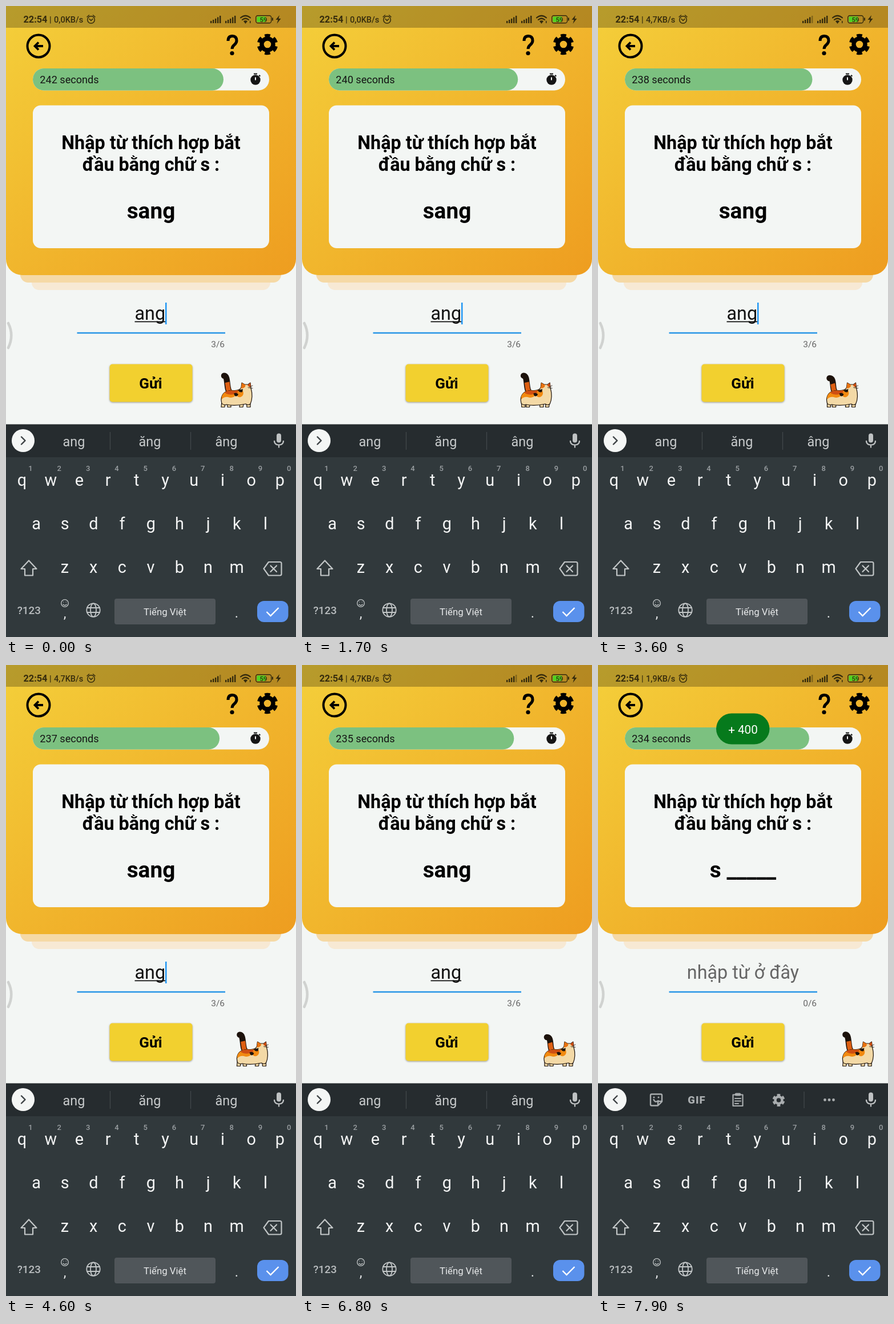
Recreate the animation shown at these times as an HTML page. Size 508x1102 px, loop 8000 ms.

```html
<!DOCTYPE html>
<html lang="vi">
<head>
<meta charset="utf-8">
<title>Word game</title>
<style>
html, body { margin: 0; width: 100%; height: 100%; overflow: hidden; background: #f3f6f4; }
svg { display: block; width: 508px; height: 1102px; font-family: Roboto, sans-serif; }
.mid { text-anchor: middle; }
.bold { font-weight: 700; }
.line { fill: none; stroke-linecap: round; stroke-linejoin: round; }
</style>
</head>
<body>
<svg viewBox="0 0 508 1102">
  <defs>
    <linearGradient id="sun" x1="0" y1="0" x2="1" y2="1">
      <stop offset="0" stop-color="#f4cf3a"/><stop offset="1" stop-color="#ee9d20"/>
    </linearGradient>
    <g id="gear" fill="none" stroke="currentColor">
      <circle r="10" stroke-width="7.4"/>
      <circle r="15" stroke-width="6.4" pathLength="6" stroke-dasharray=".58 .42" transform="rotate(-107.4)"/>
    </g>
    <g id="bars"><path d="M0 30v-4h2.4v4zM4 30v-6h2.4v6zM8 30v-8h2.4v8zM12 30v-10.500h2.400v10.500z"/></g>
    <clipPath id="hide"><use href="#body"/></clipPath>
  </defs>

  <!-- header -->
  <rect width="508" height="1102" fill="#f3f6f4"/>
  <rect x="45" y="440" width="418" height="56" rx="13" fill="#f7e9d4"/>
  <rect x="25" y="430" width="457" height="53" rx="14" fill="#f5d9a6"/>
  <path d="M0 0H508V442a28 28 0 0 1-28 28H28a28 28 0 0 1-28-28z" fill="url(#sun)"/>
  <rect width="508" height="38" fill="#000" opacity=".25"/>

  <!-- status bar -->
  <g fill="#352b0d" font-weight="500">
    <text x="30.500" y="28.500" font-size="16.300" class="bold">22:54</text>
    <text x="76" y="28.500" font-size="14.500">|</text>
    <text id="speed" x="84" y="28.500" font-size="14.500"></text>
    <g class="line" stroke="#352b0d" stroke-width="1.500">
      <circle cx="149" cy="24" r="6.300"/>
      <path d="M146 22.500l3 3 3-3M142 19l3.500-3M156 19l-3.500-3"/>
      <path d="M411 20.500q8.500-7 17 0M414 24q5.500-4.500 11 0" stroke-width="2.200"/>
    </g>
    <path d="M416 26.500q3.500-2.500 7 0l-3.500 4.500z"/><path d="M427 26h1.500v4h-1.500z"/>
    <use href="#bars" x="358"/><path id="top1" d="M374 30v-13h2.400v13z"/>
    <use href="#bars" x="384"/><path d="M400 30v-13h2.400v13z"/>
    <rect x="437.700" y="16.700" width="27" height="13" rx="3.500" fill="none" stroke="#352b0d" stroke-width="1.400"/>
    <rect x="439.500" y="18.500" width="16" height="9.400" rx="1.500" fill="#4fd322"/>
    <path d="M466 20.500h2v5h-2z"/>
    <text x="451" y="27.500" font-size="11.500" class="mid">59</text>
    <path d="M479 16l-6.500 8h4l-2 7 7-9h-4z"/>
  </g>

  <!-- top buttons -->
  <g class="line" stroke="#000">
    <circle cx="57" cy="70" r="19.500" stroke-width="4"/>
    <path d="M65 70H51M57 63.500L50.500 70l6.500 6.500" stroke-width="3.800" stroke-linecap="butt" stroke-linejoin="miter"/>
    <path d="M389 61q0-8.500 7.500-8.500t7.500 8q0 4-4 7.200t-4 7.300" stroke-width="5" stroke-linecap="butt"/>
  </g>
  <circle cx="396" cy="82.500" r="3.600"/>
  <use href="#gear" x="458" y="67" color="#000"/>

  <!-- timer -->
  <rect x="47" y="109" width="414" height="38.500" rx="19.200" fill="#f3f6f4"/>
  <rect id="bar" x="47" y="109" height="38.500" rx="19.200" fill="#7cc180"/>
  <text id="secs" x="59.300" y="134.700" font-size="18.100" fill="#151515"></text>
  <g fill="#151515"><circle cx="437" cy="129" r="8.700"/><path d="M434 117.500h6v2h-6zM442.500 121.500l1.500-1.500 2 2-1.500 1.500z"/></g>
  <path d="M437 124.500v5" stroke="#f3f6f4" stroke-width="2"/>

  <!-- question -->
  <rect x="47" y="173.500" width="414" height="249.500" rx="14" fill="#f3f6f4"/>
  <g class="mid bold">
    <text x="254" y="250" font-size="32.300">Nhập từ thích hợp bắt</text>
    <text x="254" y="287.500" font-size="32.300">đầu bằng chữ s :</text>
    <text id="word" x="254" y="371" font-size="38.800"></text>
  </g>
  <g id="badge">
    <rect x="207" y="84.500" width="93.500" height="54" rx="27" fill="#067a1c"/>
    <text x="254" y="120" font-size="20.700" fill="#fff" class="mid">+ 400</text>
  </g>

  <!-- answer -->
  <text id="entry" x="252.300" y="548" font-size="32.300" class="mid"></text>
  <path id="under" d="M225.500 551.300h53.500" stroke="#111" stroke-width="1.800"/>
  <rect id="caret" width="2.500" fill="#2196f3"/>
  <path d="M124.500 571h259.500" stroke="#2795e6" stroke-width="2.700"/>
  <text id="count" x="383" y="595.500" font-size="15.500" fill="#666" text-anchor="end"></text>
  <path d="M4 554q10.500 21 0 43" class="line" stroke="#d0d2d0" stroke-width="4.600"/>
  <g id="button">
    <rect x="181.500" y="625.500" width="145" height="66" rx="5" fill="#f2d02f"/>
    <rect id="glow" x="181.500" y="625.500" width="145" height="66" rx="5" fill="#f3f1e0"/>
  </g>
  <text x="253.500" y="668" font-size="25.900" class="mid bold">Gửi</text>

  <!-- cat -->
  <g id="cat" class="line" stroke="#1c120b" stroke-width="1.200">
    <path id="tail" stroke-width="10.500"/>
    <path id="tailFur" stroke="#dd5f12" stroke-width="8" stroke-linecap="butt"/>
    <g id="legs" fill="#f3d9a6"></g>
    <path id="body" fill="#f3d9a6" d="M2 54C-1 44 3 34 14 32C21 30 27 34 34 29L36 26L37 18L42 21H48L52 18L53 27C56 38 56 46 52 55Q48 58 44 55Q25 59 10 56Q5 58 2 54z"/>
    <g clip-path="url(#hide)" stroke="none">
      <path fill="#f28a10" d="M0 30H30L39 32Q42 40 35 43Q30 44 27 39Q22 46 13 43Q6 42 2 47z"/>
      <path fill="#cf4f12" d="M8 30H30V35Q18 42 8 36z"/>
      <path fill="#1c120b" d="M23 37q4-3 8 1q-2 5-6 3zM30 31l9-2-1 5q-4 2-8-3z"/>
      <path fill="#e8720f" d="M35 16h9l-1 9q-4 4-8 2z"/>
      <path fill="#cf4f12" d="M47 22l7-6v9q-4 2-7-3z"/>
    </g>
    <path d="M48 26l1.500 1 1.500-1M51 25l5-2M51 27l5 .5" stroke-width=".8"/>
  </g>

  <!-- keyboard -->
  <rect y="730.500" width="508" height="58" fill="#262c2f"/>
  <rect y="788" width="508" height="314" fill="#31393c"/>
  <circle cx="30" cy="759" r="20" fill="#f4f6f5"/>
  <path id="chevron" class="line" stroke="#3c4144" stroke-width="2.400" stroke-linecap="butt" stroke-linejoin="miter"/>
  <g id="hints" font-size="23.400" fill="#c8cbcc" class="mid">
    <text x="119" y="768.500">ang</text><text x="252" y="768.500">ăng</text><text x="386" y="768.500">âng</text>
    <path d="M182.500 744v31M323.500 744v31" stroke="#41484b" stroke-width="1.300"/>
  </g>
  <g id="tools" color="#a9adaf">
    <g class="line" stroke="#a9adaf" stroke-width="2.400">
      <path d="M94 749.500h16q2 0 2 2v11l-7 7h-11q-2 0-2-2v-16q0-2 2-2zM112 762h-5q-2 0-2 2v5M97.500 759q2.500 6 8 2"/>
      <path d="M98 755v.1M106 755v.1" stroke-width="3"/>
      <path d="M236.500 750.500h17v19.500h-17zM240 757h10M240 761.500h10M240 766h6" stroke-width="2.200"/>
      <path d="M242 750h6" stroke-width="5"/>
    </g>
    <text x="173" y="766" font-size="18.500" letter-spacing="1" fill="#a9adaf" class="mid" font-weight="900">GIF</text>
    <use href="#gear" transform="translate(316.500 760) scale(.6)"/>
    <path d="M361 745v29" stroke="#41484b" stroke-width="1.300"/>
    <g fill="#a9adaf"><circle cx="397.500" cy="759.500" r="2.400"/><circle cx="405" cy="759.500" r="2.400"/><circle cx="412.500" cy="759.500" r="2.400"/></g>
  </g>
  <rect x="474" y="746.500" width="8" height="16" rx="4" fill="#bfc2c3"/>
  <path d="M470 759q0 7.500 8 7.500t8-7.500M478 766.500v5" fill="none" stroke="#bfc2c3" stroke-width="2.200"/>
  <g id="keys" class="mid" font-size="28.800" fill="#f4f5f5"></g>
  <g class="line" stroke="#c2c6c7" stroke-width="2.200">
    <path d="M40 968.500L26.500 983H33v11.500h14V983h6.500z"/>
    <path d="M460 971h20q2.500 0 2.500 2.500v18.500q0 2.500-2.500 2.500h-20l-8.500-11.800zM463.500 977.500l10.500 10.500M474 977.500l-10.500 10.500"/>
    <g stroke-width="1.800"><circle cx="153" cy="1055" r="11.700"/><ellipse cx="153" cy="1055" rx="5" ry="11.700"/><path d="M142 1051h22M142 1059h22"/></g>
    <g stroke-width="1.300"><circle cx="103" cy="1043" r="6.300"/><path d="M100 1045q3 3.500 6 0M100.800 1041v.1M105.200 1041v.1"/></g>
  </g>
  <rect x="190" y="1035" width="177" height="45" rx="4" fill="#50565a"/>
  <g class="mid" fill="#e7e9ea">
    <text x="40.300" y="1062" font-size="18.800" font-weight="500" fill="#b9bdbf">?123</text>
    <text x="278.500" y="1063.500" font-size="16.800">Tiếng Việt</text>
    <text x="103" y="1069" font-size="24">,</text><text x="404" y="1068" font-size="24">.</text>
  </g>
  <rect x="440" y="1039" width="54.500" height="37" rx="12" fill="#5a91ec"/>
  <path d="M456.500 1058l7 7 14-14" fill="none" stroke="#fff" stroke-width="2.400"/>
</svg>
<script>
const LOOP = 8000, SENT = 7000;
const el = id => document.getElementById(id);
const set = (id, attrs) => { for (const k in attrs) el(id).setAttribute(k, attrs[k]); };
const show = (id, on) => set(id, { visibility: on ? 'visible' : 'hidden' });
const clamp = v => Math.max(0, Math.min(1, v));

// letter keys with the small digits above the first row
const rows = [['qwertyuiop', 28, 838], ['asdfghjkl', 53, 914], ['zxcvbnm', 103, 990]];
el('keys').innerHTML = rows.map(([row, x, y]) => [...row].map((c, i) =>
  `<text x="${x + i * 50.2}" y="${y}">${c}</text>` + (y < 900 ?
  `<text x="${43 + i * 50.3}" y="812" font-size="13" font-weight="500" fill="#9a9fa2">${(i + 1) % 10}</text>` : '')
).join('')).join('');

function drawCat(t) {
  const c = t < 500 ? 600 : t;
  const phase = c / 800 % 1;
  const low = clamp(1.1 - Math.abs(phase - .44) * 3.4);
  const x = t < 500 ? 376 : 369.6 + .00732 * c + 4 * low;
  set('cat', { transform: `translate(${x} 640)` });
  const tip = 5.5 + 5 * low, bend = 14 + 2 * low;
  set('tail', { d: `M17 36C9 30 ${bend} ${tip} 6 ${tip}` });
  set('tailFur', { d: `M17 38C12 31 13 24 11.6 ${17 + 3 * low}` });
  el('legs').innerHTML = [5, 14, 37, 48].map((lx, i) => {
    const step = Math.sin(phase * 2 * Math.PI + i * Math.PI);
    return `<path d="M${lx - 3} 50L${lx - 3 + step} 60.500h6L${lx + 4} 50"/>`;
  }).join('');
}

function draw(t) {
  const sent = t >= SENT;
  const left = t < 500 ? 242 : 241 - Math.floor((t - 500) / 1000);
  el('secs').textContent = left + ' seconds';
  set('bar', { width: 414 * left / 300 });
  el('speed').textContent = (t < 3000 ? '0,0' : sent ? '1,9' : '4,7') + 'KB/s';
  set('top1', { opacity: t < 3000 ? 1 : .4 });

  el('word').textContent = sent ? 's _____' : 'sang';
  el('entry').textContent = sent ? 'nhập từ ở đây' : 'ang';
  set('entry', { fill: sent ? '#666' : '#111', x: sent ? 254 : 252.3 });
  el('count').textContent = sent ? '0/6' : '3/6';
  show('under', !sent);
  show('hints', !sent);
  show('tools', sent);
  set('chevron', { d: sent ? 'M33.500 752.500l-6.500 6.500 6.500 6.500' : 'M27 752.500l6.500 6.500-6.500 6.500' });

  const blink = t % 1000;
  show('caret', t < 500 || blink >= 300 && blink < 800);
  set('caret', sent ? { x: 252.5, y: 520, height: 33 } : { x: 279, y: 518, height: 38 });

  const press = clamp((t - 6850) / 150) * clamp((7750 - t) / 350);
  set('glow', { opacity: .42 * press });
  el('button').style.filter = `drop-shadow(0 ${1.5 + 4 * press}px ${1.5 + 3 * press}px rgba(0,0,0,.38))`;

  const age = t - SENT;
  set('badge', { opacity: clamp((age + 50) / 200) * sent, transform: `translate(0 ${sent ? 16 * Math.exp(-age / 110) : 16})` });
  drawCat(t);
}

function frame() {
  draw(Math.floor(performance.now() % LOOP / 100) * 100);
  requestAnimationFrame(frame);
}
frame();
</script>
</body>
</html>
```
